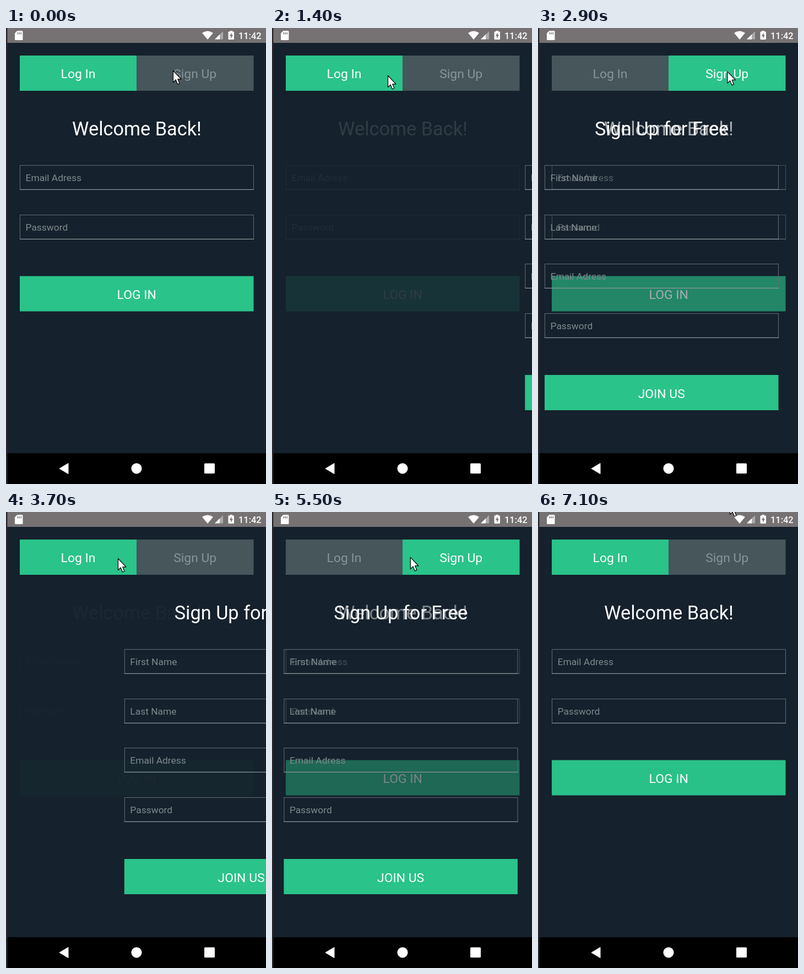
Write an HTML page that moves like this. It is 472 px wide and 828 px high and loops after 7200 ms.

```html
<!DOCTYPE html>
<html lang="en">
<head>
<meta charset="utf-8">
<title>Log in / sign up</title>
<style>
  html, body { margin: 0; width: 100%; height: 100%; overflow: hidden; background: #15212c; }
  svg { display: block; width: 100%; height: 100%; }
  text { font-family: Roboto, Arial, sans-serif; fill: #fff; }
  .mid { text-anchor: middle; }
  .title { font-size: 34.3px; }
  .label { font-size: 22.9px; }
  .hint { font-size: 17.4px; fill: #7f898e; }
  .clock { font-size: 16.4px; font-weight: 500; }
  .green { fill: #2ac38a; }
  .box { fill: none; stroke: #626e76; }
  .base { stroke: #8b959a; stroke-width: 1.3; }
</style>
</head>
<body>
<svg viewBox="0 0 472 828" preserveAspectRatio="none">
  <rect width="472" height="828" fill="#15212c"/>
  <g id="login"></g>
  <g id="signup"></g>
  <g id="tabs">
    <rect x="25" y="50" width="212.5" height="64"/>
    <rect x="237" y="50" width="212.5" height="64"/>
    <text class="label mid" x="131" y="91">Log In</text>
    <text class="label mid" x="343.2" y="91">Sign Up</text>
  </g>

  <rect width="472" height="27" fill="#767273"/>
  <g fill="#fff">
    <path d="M20.5 5H29q1.5 0 1.5 1.5V20.500q0 1.500-1.500 1.500H17.500q-1.500 0-1.500-1.500V9.500Z"/>
    <path d="M21.300 8v3.500M24.300 8v3.500M27.300 8v3.500" stroke="#767273" stroke-width="1.500"/>
    <path d="M366 21L356 9Q366 2 376 9Z"/>
    <path d="M379 20.500L394 6V20.500Z" opacity=".4"/>
    <path d="M379 20.500L388 11.800V20.500Z"/>
    <path d="M406.500 5h4.500v1.500h2q1 0 1 1V20q0 1-1 1h-8.500q-1 0-1-1V7.500q0-1 1-1h2Z"/>
    <path d="M409.600 8.500L405.800 14.500H408.300V19L412 12.800H409.600Z" fill="#767273"/>
  </g>
  <text class="clock" x="422" y="19.700">11:42</text>

  <rect y="772" width="472" height="56"/>
  <g fill="#fff">
    <path d="M97 800L113 790.500V809.500Z" stroke="#fff" stroke-linejoin="round"/>
    <circle cx="237" cy="799.800" r="9.600"/>
    <rect x="360" y="790.500" width="19" height="18.500" rx="1.500"/>
  </g>
  <rect width="2.500" height="828" fill="#2b2a2e"/>
  <path id="cursor" d="M.5 .5V21.500L5.200 17L8.500 25L12 23.500L8.800 15.800H15Z"
    fill="#fff" stroke="#000" stroke-width="1.200" stroke-linejoin="round"/>
</svg>
<script>
const LOOP = 7200, FADE = 900, HIDDEN = 472, SHOWN = -2;

// moments the tabs are pressed; they alternate sign up, log in
const taps = [85, 1215, 2525, 3620, 5018, 6250];

// pointer moves: start, end, x, y
const moves = [
  [0, 0, 303, 77],
  [200, 680, 210, 86],
  [1450, 2060, 360, 78],
  [2780, 3380, 203, 84],
  [3900, 4560, 313, 81],
  [5250, 5780, 178, 83],
  [6550, 7100, 348, -17]
];

const $ = id => document.getElementById(id);
const clamp = v => Math.min(1, Math.max(0, v));

function field(y, hint) {
  return `<rect class="box" x="25.5" y="${y + .5}" width="424" height="44"/>
    <path class="base" d="M25 ${y + 44.3}H450"/>
    <text class="hint" x="35.500" y="${y + 29}">${hint}</text>`;
}

function form(title, hints, buttonY, button) {
  return `<text class="title mid" x="237.500" y="195">${title}</text>
    ${hints.map((h, i) => field(Math.round(249 + i * 89.6), h)).join("")}
    <rect class="green" x="25" y="${buttonY}" width="424.500" height="64"/>
    <text class="label mid" x="237.200" y="${buttonY + 41.500}">${button}</text>`;
}

$("login").innerHTML = form("Welcome Back!", ["Email Adress", "Password"], 450.5, "LOG IN");
$("signup").innerHTML = form("Sign Up for Free",
  ["First Name", "Last Name", "Email Adress", "Password"], 630, "JOIN US");

const [leftTab, rightTab, leftText, rightText] = $("tabs").children;

// damped spring from 0 to 1
function spring(ms) {
  const s = ms / 1000, decay = 11, freq = 10.45;
  return 1 - Math.exp(-decay * s) * (Math.cos(freq * s) + decay / freq * Math.sin(freq * s));
}

// cubic-bezier(.42, 0, 1, 1)
function easeIn(x) {
  let lo = 0, hi = 1;
  for (let i = 0; i < 20; i++) {
    const p = (lo + hi) / 2, q = 1 - p;
    if (1.26 * q * q * p + 3 * q * p * p + p ** 3 < x) lo = p; else hi = p;
  }
  return 3 * (1 - lo) * lo * lo + lo ** 3;
}

const easeInOut = u => u < .5 ? easeIn(2 * u) / 2 : 1 - easeIn(2 - 2 * u) / 2;

function paintTab(tab, label, on) {
  tab.setAttribute("fill", on ? "#2ac38a" : "#46565b");
  label.style.fill = on ? "#fff" : "#87959a";
}

function pointer(t) {
  let [, , x, y] = moves[0];
  for (const [from, to, nx, ny] of moves.slice(1)) {
    const u = clamp((t - from) / (to - from)), k = u * u * (3 - 2 * u);
    x += (nx - x) * k;
    y += (ny - y) * k;
  }
  return `translate(${x} ${y})`;
}

function draw(t) {
  const n = taps.filter(tap => tap <= t).length;
  const signing = n % 2 === 1;
  let slide = HIDDEN, opacity = 1;
  if (n) {
    const age = t - taps[n - 1], k = spring(age), fade = easeInOut(clamp(age / FADE));
    slide = signing ? HIDDEN + (SHOWN - HIDDEN) * k : SHOWN + (HIDDEN - SHOWN) * k;
    opacity = signing ? 1 - fade : fade;
  }
  $("signup").setAttribute("transform", `translate(${slide} 0)`);
  $("login").setAttribute("opacity", opacity);
  paintTab(leftTab, leftText, !signing);
  paintTab(rightTab, rightText, signing);
  $("cursor").setAttribute("transform", pointer(t));
}

const start = performance.now();
function tick() {
  draw((performance.now() - start) % LOOP);
  requestAnimationFrame(tick);
}
tick();
</script>
</body>
</html>
```
